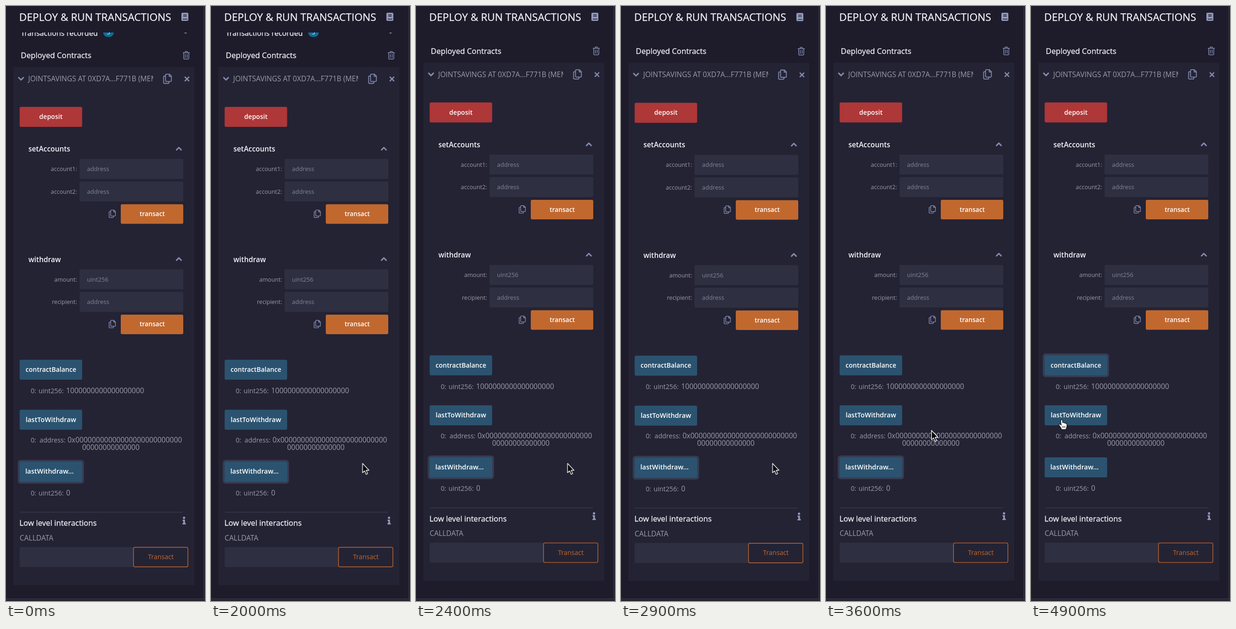
An HTML page that plays this animation: 430 by 1280 pixels, repeating every 5 s.

```html
<!DOCTYPE html>
<html lang="en">
<head>
<meta charset="utf-8">
<title>Deploy and run transactions</title>
<style>
  html, body { margin: 0; width: 430px; height: 1280px; overflow: hidden; background: #1e1c2b; }
  svg { display: block; }
  text { font: 400 14.2px "Open Sans", "Noto Sans", sans-serif; fill: #9c9bab; }

  .title, .head { fill: #f4f4f9; stroke: #f4f4f9; stroke-width: .3; }
  .title { font-size: 22.5px; }
  .head { font-size: 16.7px; }
  .caps { font-size: 15.5px; }
  .name { font-size: 15.4px; font-weight: 600; fill: #f4f4f9; }
  .label { font-size: 12.5px; text-anchor: end; }
  .hint { font-size: 13px; fill: #858594; }
  .btn { font-size: 14px; font-weight: 600; fill: #fff; text-anchor: middle; }
  .num { font-size: 15.5px; }
  .wide { font-size: 14.5px; }

  .bg { fill: #1e1c2b; }
  .card { fill: #242334; }
  .field { fill: #2e2f40; }
  .red { fill: #ae3738; }
  .orange { fill: #c1682f; }
  .blue { fill: #2b5370; }
  .ring { fill: #373c52; }
  .icon { fill: none; stroke: #828aae; stroke-width: 1.7; stroke-linejoin: round; }
  .bold { stroke-width: 3; stroke-linecap: round; }
  .solid { fill: #929abb; }
  .rule { stroke: #424253; }

  #page, #list, #pointer, #arrow, #hand, #ringA, #ringB, #balance {
    animation: 5s step-end infinite;
  }
  #page { animation-name: bounce; }
  #list { animation-name: scroll; }
  #pointer { animation-name: move; }
  #arrow { animation-name: arrow; }
  #hand { animation-name: hand; }
  #ringA { animation-name: focusIn; }
  #ringB { animation-name: focusOut; }
  #balance { animation-name: hover; }

  @keyframes scroll {
    0% { transform: none; }
    46% { transform: translateY(-5px); }
    48%, 100% { transform: translateY(-9.4px); }
  }
  @keyframes bounce {
    0% { transform: none; }
    58% { transform: translateY(.6px); }
    60% { transform: translateY(1.2px); }
    62% { transform: translateY(1.4px); }
    68% { transform: translateY(1px); }
    70% { transform: translateY(.5px); }
    72%, 100% { transform: none; }
  }
  @keyframes move {
    0%, 24% { transform: translate(402px, 964px); animation-timing-function: steps(2, end); }
    28% { transform: translate(350px, 976px); animation-timing-function: steps(3, end); }
    34% { transform: translate(327.5px, 984px); }
    70% { transform: translate(306px, 966px); animation-timing-function: steps(2, end); }
    74% { transform: translate(150px, 860px); animation-timing-function: steps(2, end); }
    78% { transform: translate(20px, 785px); }
    80% { transform: translate(36px, 777px); }
    82% { transform: translate(45px, 770px); }
    84% { transform: translate(48px, 768px); }
    94% { transform: translate(50px, 780px); }
    96% { transform: translate(57px, 830px); }
    98%, 100% { transform: translate(66px, 890px); }
  }
  @keyframes arrow {
    0% { visibility: hidden; }
    24% { visibility: visible; }
    80% { visibility: hidden; }
    96% { visibility: visible; }
    98%, 100% { visibility: hidden; }
  }
  @keyframes hand {
    0% { visibility: hidden; }
    80% { visibility: visible; }
    96% { visibility: hidden; }
    98%, 100% { visibility: visible; }
  }
  @keyframes focusIn {
    0% { visibility: hidden; }
    90%, 100% { visibility: visible; }
  }
  @keyframes focusOut {
    0% { visibility: visible; }
    90%, 100% { visibility: hidden; }
  }
  @keyframes hover {
    0% { fill: #2b5370; }
    82% { fill: #284a62; }
    84% { fill: #263f54; }
    96%, 100% { fill: #2b5370; }
  }
</style>
</head>
<body>
<svg width="430" height="1280" viewBox="0 0 430 1280">
  <defs>
    <g id="copy" class="icon">
      <path d="M5 5H2.5A1.5 1.5 0 0 0 1 6.5v12A1.5 1.5 0 0 0 2.5 20h8a1.5 1.5 0 0 0 1.5-1.5V16"/>
      <path d="M6.5 1H13l4 4v9.5a1.5 1.5 0 0 1-1.5 1.5h-9A1.5 1.5 0 0 1 5 14.5v-12A1.5 1.5 0 0 1 6.5 1zM12.5 1v4.5H17"/>
    </g>
    <g id="form">
      <path class="icon bold" d="M368.5 309.500l5-5 5 5"/>
      <rect class="field" x="159" y="329" width="224" height="43" rx="2"/>
      <rect class="field" x="159" y="377.5" width="224" height="43" rx="2"/>
      <use href="#copy" transform="translate(222 438) scale(.85)"/>
      <rect class="orange" x="248" y="426.5" width="135" height="42" rx="3"/>
      <text class="btn" x="316" y="452" style="font-size:13.7px">transact</text>
    </g>
    <rect id="box" width="135" height="43" rx="3"/>
    <rect id="halo" class="ring" x="-4" y="-4" width="143" height="51" rx="6"/>
    <clipPath id="nameClip"><rect x="40" y="140" width="278" height="34"/></clipPath>
  </defs>

  <rect class="bg" width="430" height="1280"/>

  <g id="page">
    <g id="list">
      <text class="head" x="32" y="63.5" style="font-size:16.1px">Transactions recorded</text>
      <rect x="210" y="47" width="23" height="19.5" rx="9.7" fill="#0a6f9c"/>
      <text x="221.5" y="61" text-anchor="middle" style="font-size:12px;fill:#fff">3</text>
      <path class="icon" d="M383 54l5 5 5-5"/>

      <text class="head" x="32" y="112">Deployed Contracts</text>
      <g class="icon" style="stroke-width:1.5">
        <path d="M382 100.5h15M386.500 100l1-2.300h4l1 2.300M384 101v11.5a1.8 1.8 0 0 0 1.8 1.8h7.4a1.8 1.8 0 0 0 1.8-1.8V101"/>
        <path d="M387.5 103.500v8M391.500 103.500v8"/>
      </g>

      <rect class="card" x="16" y="131" width="391" height="1115" rx="2"/>
      <path class="icon bold" d="M27.5 154l5 5 5-5"/>
      <g clip-path="url(#nameClip)">
        <text class="caps" x="48" y="162">JOINTSAVINGS AT 0XD7A...F771B (MEMORY)</text>
      </g>
      <use href="#copy" transform="translate(339.5 145.5) scale(1.05)"/>
      <path class="icon bold" d="M387 153l8 8m0-8l-8 8" style="stroke-width:2.6"/>

      <use href="#box" class="red" x="29.5" y="217"/>
      <text class="btn" x="97" y="243">deposit</text>

      <use href="#form"/>
      <text class="name" x="48.5" y="313">setAccounts</text>
      <text class="label" x="153.5" y="355">account1:</text>
      <text class="hint" x="175" y="355">address</text>
      <text class="label" x="153.5" y="403.5">account2:</text>
      <text class="hint" x="175" y="403.5">address</text>

      <use href="#form" y="237.4"/>
      <text class="name" x="48.5" y="550.5">withdraw</text>
      <text class="label" x="153.5" y="592.5">amount:</text>
      <text class="hint" x="175" y="592.5">uint256</text>
      <text class="label" x="153.5" y="641">recipient:</text>
      <text class="hint" x="175" y="641">address</text>

      <g transform="translate(29.5 761)">
        <use id="ringA" href="#halo"/>
        <use id="balance" href="#box" class="blue"/>
      </g>
      <text class="btn" x="97" y="787">contractBalance</text>
      <text x="53.5" y="833">0:</text>
      <text x="70.5" y="833">uint256:</text>
      <text class="num" x="130" y="833">1000000000000000000</text>

      <use href="#box" class="blue" x="29.5" y="868.5"/>
      <text class="btn wide" x="97" y="894.5">lastToWithdraw</text>
      <text x="53.5" y="939">0:</text>
      <text x="72.5" y="939">address:</text>
      <text class="num" x="133" y="939">0x00000000000000000000000000</text>
      <text class="num" x="164.5" y="955">00000000000000</text>

      <g transform="translate(29.5 980.5)">
        <use id="ringB" href="#halo"/>
        <use href="#box" class="blue"/>
      </g>
      <text class="btn wide" x="94" y="1006">lastWithdraw...</text>
      <text x="53.5" y="1052.5">0:</text>
      <text x="70.5" y="1052.5">uint256:</text>
      <text class="num" x="130" y="1052.5">0</text>

      <path class="rule" d="M30 1089H382"/>
      <text class="head" x="29" y="1118">Low level interactions</text>
      <g class="solid">
        <circle cx="384.7" cy="1101" r="2.5"/>
        <path d="M381.5 1105h5.2v7.5h1.8v2.7h-7.2v-2.7h1.8v-4.8h-1.6z"/>
      </g>
      <text class="caps" x="29.5" y="1149.5">CALLDATA</text>
      <rect class="field" x="29.5" y="1164" width="246" height="43" rx="2"/>
      <rect class="card" x="275.5" y="1164.5" width="117.5" height="42" rx="3" style="stroke:#c1682f;stroke-width:1.4"/>
      <text x="334.5" y="1190" text-anchor="middle" style="fill:#c1682f">Transact</text>
    </g>

    <rect class="bg" y="-3" width="427" height="60"/>
    <text class="title" x="28.5" y="31.5">DEPLOY &amp; RUN TRANSACTIONS</text>
    <rect class="solid" x="379" y="14.5" width="15" height="17.5" rx="2.5"/>
    <path d="M383 19h7.5M383 22h7.5M382 28.300h10" stroke="#1e1c2b" stroke-width="1.4"/>
  </g>

  <path class="rule" d="M427.5 0V1275"/>
  <rect y="1276" width="430" height="4" fill="#24232c"/>
  <path class="rule" d="M0 1275.5H430"/>

  <g id="pointer" stroke-linejoin="round">
    <path id="arrow" d="M0 0V20L4.500 16 7.600 23.600 11 22.100 7.900 14.700H13.800Z" fill="#000" stroke="#fff" stroke-width="1.4"/>
    <g id="hand">
      <path d="M-1.8 1.8C-1.8-.6 1.6-.6 1.9 1.7L2.7 6.6C3.5 5.2 5.8 5.6 5.9 7.3 6.9 6.2 8.7 6.7 8.9 8.3 10.2 7.6 11.4 8.500 11.5 10V14C11.5 16 10 17.5 9.7 21H0C-.4 17.5-3.2 15.5-5 12.2-6.4 9.7-3.8 8.300-2.2 10.2L-.7 11.9Z" fill="#fff" stroke="#000" stroke-width="1.1"/>
      <path d="M2 13.500v4M4.700 13.500v4M7.400 13.500v4" stroke="#000"/>
    </g>
  </g>
</svg>
</body>
</html>
```
